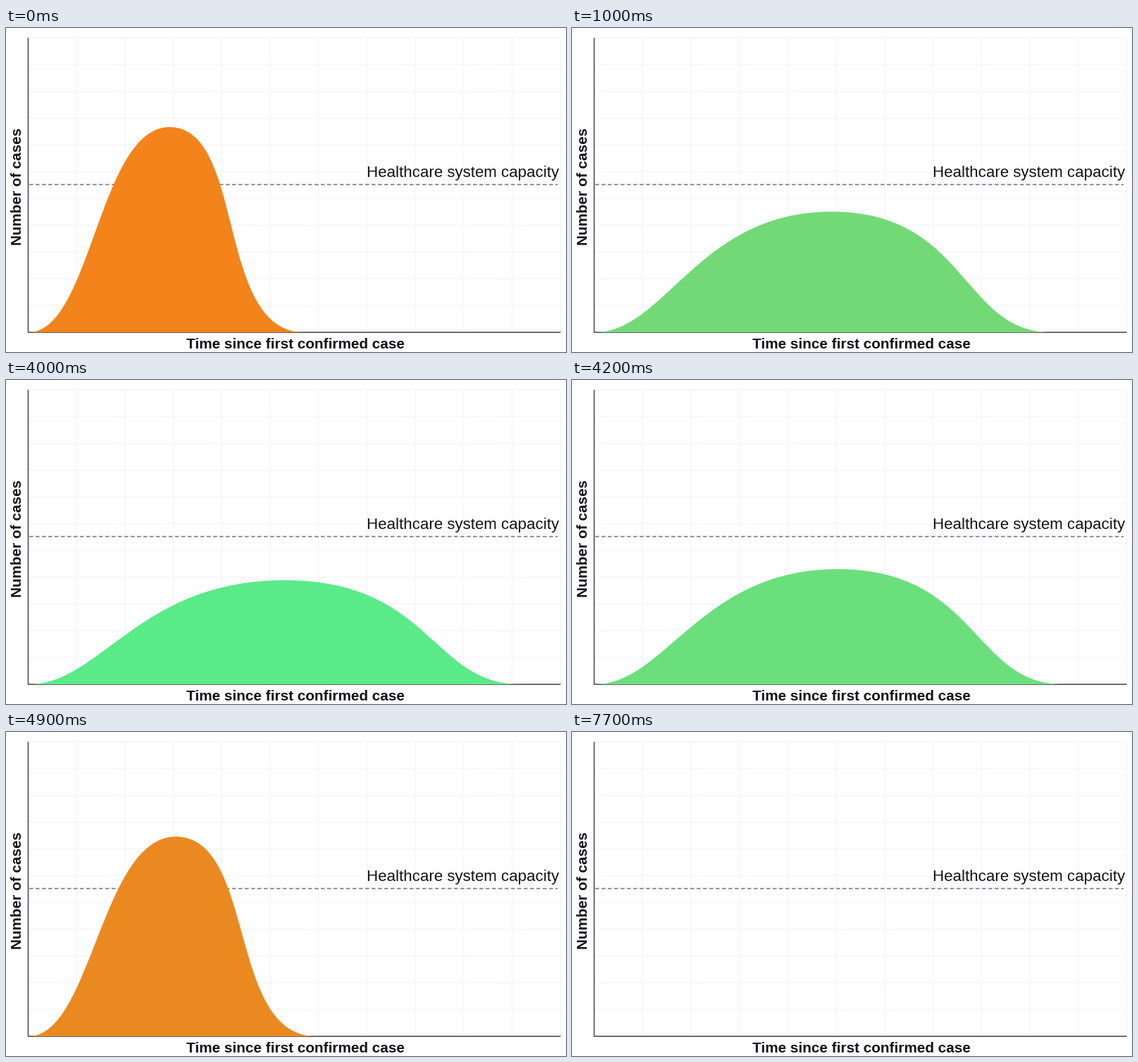
Write a matplotlib script that moves like this. It is 795 px wide and 461 px high and loops after 10 s.

```python
import numpy as np
import matplotlib.pyplot as plt
from matplotlib.animation import FuncAnimation
from matplotlib.colors import to_rgb
from matplotlib.patches import PathPatch
from matplotlib.path import Path

W, H, DPI = 795, 461, 64
FRAMES, STEP = 100, 100
PT = 72 / DPI
LEFT, RIGHT, TOP, BASE = 31.5, 787.5, 14, 433
INK = "#141414"

# Each hump: foot, handles, peak, handles, foot along x; then the peak's y
STEEP = np.array([32, 121, 132, 232, 341, 297, 423, 141])
FLAT = np.array([32, 135, 189, 397, 607, 607, 734, 286.5])
ORANGE, GREEN = np.array(to_rgb("#f3831b")), np.array(to_rgb("#58eb89"))


def mix(a, b, k):
    return a + (b - a) * k


def settle(t, mid):
    """Quick start, then exponential settling from 0 to 1."""
    rate, knee = 4.44, 0.3
    return 1 - (1 + np.exp((t - mid) * rate / knee)) ** -knee


def flatness(t):
    return settle(min(t, 1.9), 0.605) * (1 - settle(min(t, 5.8), 4.245))


def hump_path(k):
    *xs, top = mix(STEEP, FLAT, k)
    ys = [BASE] * 2 + [top] * 3 + [BASE] * 2
    return Path(np.column_stack([xs, ys]), [Path.MOVETO] + [Path.CURVE4] * 6)


fig = plt.figure(figsize=(W / DPI, H / DPI), dpi=DPI, facecolor="#fefdff")
ax = fig.add_axes([0, 0, 1, 1])
ax.set(xlim=(0, W), ylim=(H, 0))
ax.axis("off")


def line(x, y, color, width, **kw):
    ax.plot(x, y, color=color, lw=width * PT, solid_capstyle="butt",
            snap=False, **kw)


def label(x, y, text, size, **kw):
    ax.text(x, y, text, fontsize=size * PT, family="Liberation Sans",
            color=INK, va="baseline", **kw)


for x in np.linspace(LEFT, RIGHT, 12)[1:]:
    line([x, x], [TOP, BASE], "#f5f4f8", 1.3)
for y in np.linspace(TOP, BASE, 12)[:-1]:
    line([LEFT, RIGHT], [y, y], "#f5f4f8", 1.3)

line([33, 783], [222.7, 222.7], "#807c82", 1.7,
     dashes=(5.5 / 1.7, 3.5 / 1.7), dash_capstyle="butt")
line([LEFT, LEFT, RIGHT], [TOP, BASE, BASE], "#555357", 1.7)

hump = PathPatch(hump_path(0), lw=0, zorder=3)
ax.add_patch(hump)

label(785, 212, "Healthcare system capacity", 22.25, ha="right")
label(410.5, 456.5, "Time since first confirmed case", 20.7,
      ha="center", weight="bold")
label(22.5, 225.5, "Number of cases", 20.8, ha="center", weight="bold",
      rotation=90, rotation_mode="anchor")


def draw(i):
    t = i * STEP / 1000
    k = flatness(t)
    hump.set_path(hump_path(k))
    hump.set_facecolor(mix(ORANGE, GREEN, k))
    hump.set_visible(t < 7.7)
    return hump,


anim = FuncAnimation(fig, draw, frames=FRAMES, interval=STEP, repeat=True,
                     repeat_delay=0)
plt.show()
```
